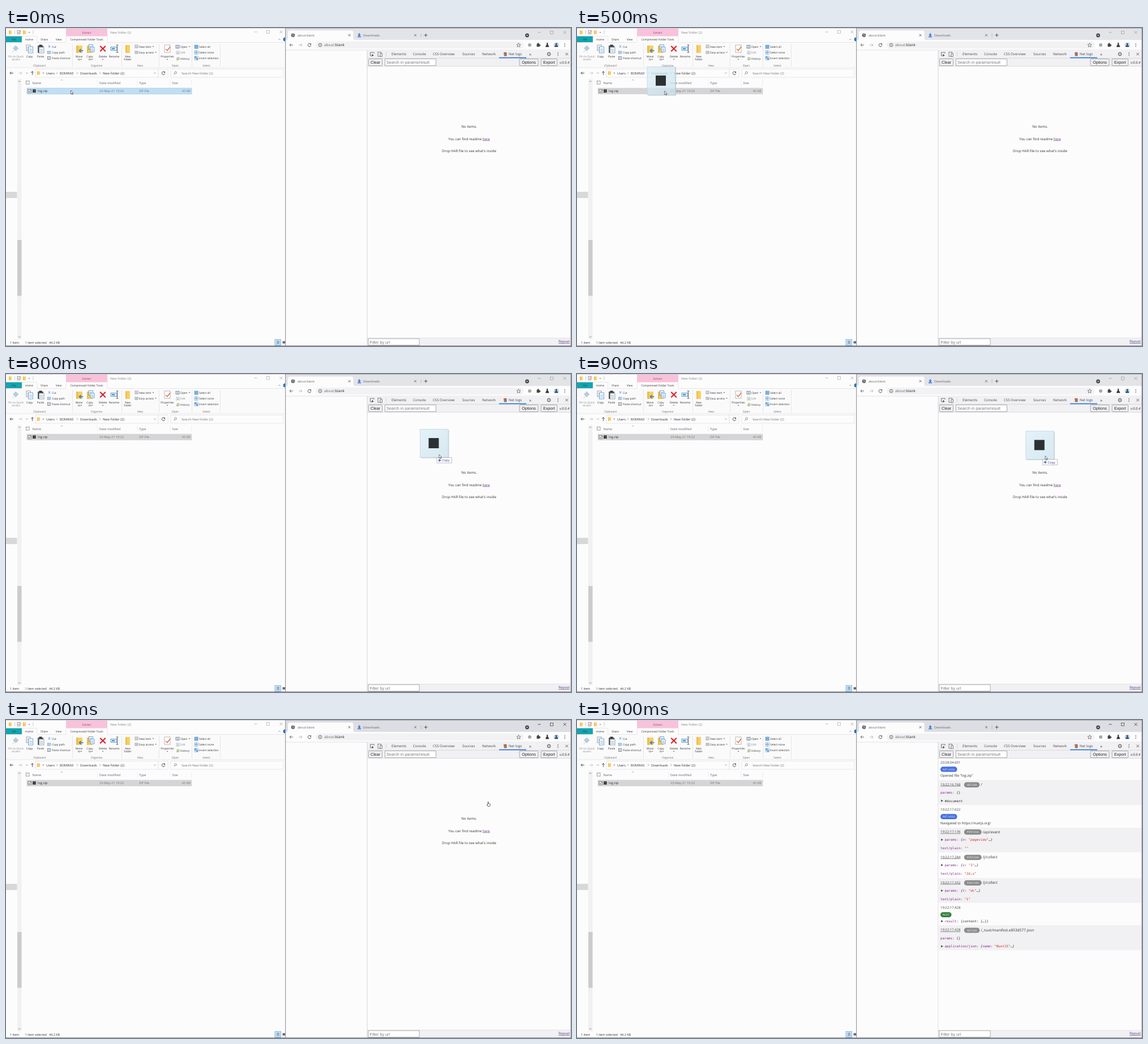
Animation of 998 by 561 pixels, one loop 2000 ms. Source, as an HTML page:

```html
<!DOCTYPE html>
<html lang="en">
<head>
<meta charset="utf-8">
<title>Drop a log file</title>
<style>
html, body { margin: 0; width: 100%; height: 100%; overflow: hidden; background: #fdfcfd; }
svg { display: block; width: 100vw; height: 100vh; font-family: "Open Sans", "Noto Sans", sans-serif; text-rendering: geometricPrecision; }
text { white-space: pre; }
.arial { font-family: "Liberation Sans", Arial, sans-serif; }
.mono { font-family: "DejaVu Sans Mono", "Liberation Mono", monospace; }
.key { fill: #8b2a96; }
.str { fill: #c4302b; }
</style>
</head>
<body>
<svg id="stage" viewBox="0 0 998 561" xmlns="http://www.w3.org/2000/svg"></svg>
<script>
const INK = '#333', GREY = '#777', BLUE = '#2f7fc4', GOLD = '#f8cf62';

// All text is placed by the vertical middle of its line.
const text = (x, y, s, size = 5.7, fill = INK, attrs = '') =>
  `<text x="${x}" y="${y + size * .36}" font-size="${size}" fill="${fill}" ${attrs}>${s}</text>`;
const mid = (x, y, s, size, fill, attrs = '') => text(x, y, s, size, fill, 'text-anchor="middle" ' + attrs);
const rect = (x, y, w, h, fill, stroke = 'none', attrs = '') =>
  `<rect x="${x}" y="${y}" width="${w}" height="${h}" fill="${fill}" stroke="${stroke}" stroke-width=".7" ${attrs}/>`;
const path = (d, stroke = INK, width = .8, fill = 'none') =>
  `<path d="${d}" stroke="${stroke}" stroke-width="${width}" fill="${fill}"/>`;
const dot = (x, y, r, fill, stroke = 'none') =>
  `<circle cx="${x}" cy="${y}" r="${r}" fill="${fill}" stroke="${stroke}" stroke-width=".8"/>`;
const group = (id, body) => `<g id="${id}">${body}</g>`;

const cross = (x, y, r, c, w = .8) => path(`M${x - r} ${y - r}l${2 * r} ${2 * r}m0 ${-2 * r}l${-2 * r} ${2 * r}`, c, w);
const arrow = (x, y, dir, c = INK) => path(`M${x - 3 * dir} ${y}h${6 * dir}m${-2.6 * dir} -2.6l${2.6 * dir} 2.6l${-2.6 * dir} 2.6`, c);
const chevron = (x, y, dx, dy, c = GREY) => path(dx
  ? `M${x - dx} ${y - 1.8}l${2 * dx} 1.8l${-2 * dx} 1.8`
  : `M${x - 1.8} ${y - dy}l1.8 ${2 * dy}l1.8 ${-2 * dy}`, c, .7);
const caret = (x, y, c = '#444') => path(`M${x - 1.3} ${y - .7}h2.6l-1.3 1.5z`, 'none', 0, c);
const folder = (x, y, w, h) => rect(x, y, w, h, GOLD) + rect(x, y, w * .3, h, '#efbb49');
const sheet = (x, y, w, h, c = GREY) => rect(x, y, w, h, '#fff', c) +
  path(`M${x + 1.5} ${y + h * .4}h${w - 3}m0 ${h * .3}h${3 - w}`, BLUE, .7);
const reload = (x, y) => path(`M${x + 2.4} ${y - 1.4}a2.8 2.8 0 1 0 .4 2`, '#444', .9) + path(`M${x + 3} ${y - 3.2}v2.6h-2.6z`, 'none', 0, '#444');
const menuDots = (x, y) => [-2.5, 0, 2.5].map(d => dot(x, y + d, .7, '#444')).join('');
const winButtons = (x, y, c) => path(`M${x - 2.5} ${y}h5`, c) + rect(x + 19.5, y - 2.5, 5, 5, 'none', c) + cross(x + 45, y, 2.5, c);

function ribbon() {
  const label = (x, y, s, c) => text(x, y, s, 4.85, c);
  const below = (x, s, c) => s.split('|').map((line, i) => mid(x, 50 + i * 5.5, line, 4.85, c)).join('');
  return rect(0, 25.5, 494, 44.5, '#fbfafb') + path('M0 25.5H28M55 25.5H106M179 25.5H494M0 70H494', '#dedde0', .7) +
    [117.5, 204.5, 270.5, 328.5, 378.5].map(x => path(`M${x} 28V68`, '#dcdcdf', .7)).join('') +
    // clipboard
    path('M17 31l5 5l-2 1l-2.5 3.5l-5 -5l3.5 -2.5zM15 38.5l-3.5 4', '#9db6c8', .7, '#b8cedd') +
    sheet(36, 30, 7, 10) + sheet(39.5, 33, 8, 11, BLUE) +
    rect(56, 31, 10, 13, '#57606a') + rect(58.5, 29.5, 5, 3, '#333') + sheet(58.5, 34, 8.5, 10) +
    path('M75 30.5l3 4M78 30.5l-3 4', BLUE) + sheet(73.5, 41, 5, 4, BLUE) + sheet(73.5, 50.5, 5, 5, '#555') +
    below(17.5, 'Pin to Quick|access', '#888') + below(41.5, 'Copy') + below(61, 'Paste') +
    label(81, 33, 'Cut') + label(81, 43, 'Copy path') + label(81, 53, 'Paste shortcut') +
    // organize
    folder(124, 31, 11, 13) + path('M136.5 40h-7m3 -3l-3 3l3 3', BLUE, 1.7) +
    folder(143, 31, 10, 13) + sheet(146.5, 29.5, 7, 8, BLUE) + sheet(149, 34, 7, 8, BLUE) +
    cross(171, 36.5, 4.8, '#d9262e', 2.2) +
    rect(185, 33.5, 11, 6, '#dcecf8', BLUE) + path('M187 36.5h5', BLUE, 2) + path('M194.5 30h4m-2 0v13m-2 0h4', '#444', .8) +
    below(129, 'Move|to') + below(148, 'Copy|to') + below(171, 'Delete') + below(191, 'Rename') +
    [133, 152, 171].map(x => caret(x, 55.5)).join('') +
    // new
    folder(211, 30, 8, 14) + sheet(228, 30, 5, 5) + sheet(228, 41, 5, 4) + below(215, 'New|folder') +
    label(235, 33, 'New item') + label(235, 43, 'Easy access') + caret(260, 33) + caret(264.5, 43) +
    // open
    rect(280, 30, 10, 13, '#fff', '#999') + path('M282 37l3 3l5 -7', '#e06a35', 1.4) + below(285, 'Properties') + caret(285, 55.5) +
    sheet(300, 30.5, 6, 5, '#4b5560') + sheet(301, 41, 5, 5, '#aaa') + dot(304, 54, 2.2, '#d5e5c9', '#7c9d70') + path('M301 56h3', '#e0a02e', 1.2) +
    label(308, 33, 'Open') + label(308, 43.5, 'Edit', '#888') + label(308, 54, 'History') + caret(324, 33) +
    // select
    [33, 43, 53].map((y, i) => [0, 3.5].map(dx => [0, 3.5].map(dy =>
      rect(333 + dx, y - 3 + dy, 2.7, 2.7, i === 0 || (i === 2 && dx === dy) ? '#6caee0' : '#fff', '#74a5ce')).join('')).join('') +
      label(341, y, ['Select all', 'Select none', 'Invert selection'][i])).join('') +
    [[59, 'Clipboard'], [160, 'Organize'], [237, 'New'], [299, 'Open'], [354, 'Select']]
      .map(([x, s]) => mid(x, 66, s, 4.85, '#666')).join('');
}

function explorer() {
  return rect(0, 0, 494, 561, '#fdfcfd') + path('M0 .4H494', '#bdbcc0', .8) +
    folder(5, 4.5, 5, 6.5) + rect(20, 4.5, 5, 6, '#fff', GREY) + path('M21 7l1.5 2l3 -4', '#d9483a') +
    folder(30, 4.5, 5, 6.5) + caret(41, 8) + path('M15.5 4v7M48 4v7', '#aaa', .6) +
    rect(106, 1, 73, 13.5, '#f8c2db') + mid(142.5, 8.5, 'Extract', 4.9, '#8c3c66') +
    text(184, 7.5, 'New folder (2)', 5.7, '#888') + winButtons(441, 7, '#aaa') +
    rect(0, 14.5, 28, 11, '#12a4af') + mid(14, 20, 'File', 4.9, '#174b52') +
    path('M28.3 25.5V14.5H54.7V25.5', '#dedde0', .7) + mid(41, 20, 'Home', 4.9) + mid(67.5, 20, 'Share', 4.9) + mid(93, 20, 'View', 4.9) +
    path('M106 25.5V14.5M179 14.5V25.5', '#ecd3df', .7) + mid(142.5, 20, 'Compressed Folder Tools', 4.95) +
    chevron(483, 20, 0, -.9) + dot(493, 20, 3.5, '#1979ca') + ribbon() +
    arrow(10, 79.5, -1) + arrow(25, 79.5, 1, '#bbb') + chevron(37, 79.5, 0, .9) + path('M46.5 83v-6.5m-2.4 2.4l2.4 -2.4l2.4 2.4') +
    rect(52, 72.5, 217, 14.5, '#fdfcfd', '#dddce0') + rect(269, 72.5, 17, 14.5, '#fdfcfd', '#dddce0') +
    rect(291, 72.5, 199, 14.5, '#fdfcfd', '#dddce0') + folder(55, 76.5, 5, 6) +
    text(64.5, 79, '«', 5.5) + text(71, 79.5, 'Users') + text(95, 79.5, 'BOMRAD') + text(131, 79.5, 'Downloads') + text(171, 79.5, 'New folder (2)', 5.8) +
    [90, 126, 166].map(x => chevron(x, 79.5, .8, 0)).join('') + chevron(263, 79.5, 0, .9) + reload(278, 79.5) +
    dot(299.5, 78.8, 1.9, 'none', GREY) + path('M298 80.3l-2 2', GREY) + text(310, 79.5, 'Search New folder (2)', 5.6, '#777') +
    // navigation pane
    rect(0, 289, 19.5, 11, '#d8d7d9') + rect(20, 90, 7.5, 459, '#f1f0f2') + rect(20, 374, 7.5, 98.5, '#cccbcd') +
    chevron(23.7, 94, 0, -.9, '#555') + chevron(23.7, 545, 0, .9, '#555') +
    // columns
    rect(35.5, 93.5, 5.5, 5.5, '#fff', GREY) + chevron(98.5, 91.8, 0, -.6, '#888') +
    [[46.5, 'Name'], [165, 'Date modified'], [235, 'Type'], [293.5, 'Size']].map(([x, s]) => text(x, 96.7, s, 5.6, '#5b6470')).join('') +
    [162, 232, 290, 328].map(x => path(`M${x} 91V102`, '#e5e4e8', .7)).join('') +
    rect(37, 106, 291, 10.5, '#c1def3', '#9cc9ea', 'id="row"') +
    rect(39, 108.5, 5.5, 5.5, '#fff', '#555') + path('M40 111l1.4 1.6l2.5 -3.2', '#333') + rect(47, 108.2, 5.8, 5.8, '#444') +
    text(56, 111.3, 'log.zip', 5.8) + text(165, 111.3, '23-May-21 19:22', 5.6, GREY) + text(235, 111.3, 'ZIP File', 5.5, GREY) +
    text(325.5, 111.3, '45 KB', 5.5, GREY, 'text-anchor="end"') +
    // status bar
    text(7, 555, '1 item', 5.5) + text(33.5, 555, '1 item selected', 5.45) + text(76, 555, '44.2 KB', 5.45) +
    rect(475, 549.5, 10.5, 10, '#cbe4f6', '#5aa2d8') + path('M478 552.5h5m-5 2h5m-5 2h5', '#456', .7) +
    rect(488.5, 552.5, 5, 4, '#667');
}

function browser() {
  const tabs = [[681, 'Elements'], [719, 'Console'], [754, 'CSS Overview'], [806, 'Sources'], [841, 'Network'], [888, 'Net logs']];
  const button = (x, w, s) => rect(x, 54.5, w, 12, '#efeef0', '#8b8b8f', 'rx="1"') + mid(x + w / 2, 60.4, s, 7.1, '#222', 'class="arial"');
  const input = (x, y, s) => rect(x, y, 90, 11.5, '#fff', '#8b8b8f') + text(x + 2.5, y + 6, s, 7.2, '#777', 'class="arial"');
  return rect(494, 0, 504, 561, '#fdfcfd') + rect(494, 1, 504, 20, '#e3e4e8', 'none', 'id="strip"') +
    path('M494 .5H998', '#a9a9ad', 1) +
    path('M495 21q3 0 3 -3V8q0 -3.5 3.5 -3.5H610q3.5 0 3.5 3.5V18q0 3 3 3z', 'none', 0, '#fdfcfd') +
    dot(507, 12.7, 3.3, '#555b62') + path('M505 11.5l2 .5l1 -2M506 15l1.5 -2l2 .5', '#dfe2e5', .8) +
    text(515, 12.7, 'about:blank', 5.4, '#666') + cross(606.5, 12.7, 1.9, '#444') +
    path('M624 9v4m-2 -1.5l2 2.2l2 -2.2M621 15.5h6', '#286bd8', 1.3) + text(631, 12.7, 'Downloads', 5.6, '#666') + cross(723, 12.7, 1.9, '#555') +
    path('M733 9v7', '#aaa', .7) + path('M738.5 12.7h6m-3 -3v6', '#444', .9) +
    dot(920.5, 13, 3.4, '#44484d') + path('M919 12.3h3l-1.5 2z', 'none', 0, '#fff') +
    group('controls', winButtons(942, 7.7, 'currentColor')) +
    // toolbar
    arrow(504, 30, -1, '#444') + arrow(520, 30, 1, '#aaa') + reload(536, 30) +
    rect(547, 23.7, 367, 12.6, '#f2f2f4', 'none', 'rx="6.3"') + dot(555, 30, 2.9, 'none', '#555') + path('M555 29.5v2.2m0 -3.7v.8', '#555') +
    text(562, 30, 'about:<tspan fill="#222">blank</tspan>', 6.45, '#666') +
    path('M905.5 26.5l1 2.4l2.6 .2l-2 1.7l.6 2.6l-2.2 -1.4l-2.2 1.4l.6 -2.6l-2 -1.7l2.6 -.2z', '#555', .7) +
    dot(925, 30, 3, '#a3aaa7') + rect(937.5, 28, 5, 5, '#444') + dot(940, 27.5, 1.3, '#444') + dot(943, 30.5, 1.2, '#444') +
    path('M954.8 26.5h2.6m-1.9 0v2.2l-2.3 4.4h5.8l-2.3 -4.4v-2.2', '#333', .8, '#333') +
    dot(972, 30, 4.8, '#bfdcf0') + dot(972, 28.3, 1.5, '#263746') + path('M969 33a3 2.7 0 0 1 6 0z', 'none', 0, '#263746') +
    menuDots(987, 30) + path('M494 39H998', '#d6d5da', .7) +
    // inspector
    rect(638, 39, 360, 28.5, '#f1f0f3') + path('M638 53.3H998M638 67.5H998', '#d0cfd4', .7) +
    path('M648 49H643.5V43H650V45', '#555', .8) + path('M646.5 45.5v4.8l1.3 -1.2h2z', 'none', 0, '#444') +
    rect(657, 42.5, 5.5, 7.5, 'none', '#555') + rect(661, 45, 3.5, 5.2, '#f1f0f3', '#555') + path('M671.5 42v8', '#ccc', .7) +
    tabs.map(([x, s]) => text(x, 46.3, s, 6.1, '#444')).join('') +
    path('M879.5 43.3h4.5v5.8h-3.3q-1.2 0 -.6 -1.5z', '#7d4428', .7, '#c98a63') + path('M881 45h2.3m-2.3 2h2.3', '#6b3418', .6) +
    rect(871, 51.7, 48, 1.5, '#1a6fdc') + mid(926, 45.8, '»', 8, '#444') +
    dot(959, 46, 2.2, 'none', '#444') + [0, 45, 90, 135].map(a => `<path d="M959 42.5v1.3M959 48.2v1.3" stroke="#444" stroke-width="1.2" transform="rotate(${a} 959 46)"/>`).join('') +
    menuDots(975, 46) + cross(990.5, 46, 2.3, '#444') +
    button(640.5, 24, 'Clear') + input(669.5, 54.7, 'Search in params/result') + button(907, 33, 'Options') + button(945, 28.5, 'Export') +
    text(978, 60.4, 'v.0.0.4', 6, INK, 'font-style="italic"') +
    rect(638, 547, 360, 13, '#f1f0f3') + path('M638 547H998', '#d8d7db', .7) + input(640, 548, 'Filter by url') +
    text(976, 553, 'Repvat', 6.2, '#5b3a86', 'text-decoration="underline"') +
    path('M638 39V560', '#c9c8cd', .8);
}

function emptyPage() {
  return mid(818, 174, 'No items.', 6.2) +
    mid(818, 195.3, 'You can find readme <tspan fill="#6a3a80" text-decoration="underline">here</tspan>', 6.15) +
    mid(818, 216.7, "Drop HAR file to see what's inside", 6.15);
}

function logPage() {
  const key = s => `<tspan class="key">${s}</tspan>`;
  const str = s => `<tspan class="str">"${s}"</tspan>`;
  const tip = s => `<tspan font-style="italic">${s}</tspan>`;
  const pair = (k, v) => tip('{' + key(k) + ': ' + str(v) + '…}');
  const mono = (y, s, opens) => (opens ? path(`M643 ${y - 2}l4 2l-4 2z`, 'none', 0, '#555') : '') +
    text(opens ? 649.5 : 642, y, s, 5.85, INK, 'class="mono"');
  const pill = (x, y, w, s, c) => rect(x, y - 4.6, w, 9.2, c, 'none', 'rx="4.6"') + mid(x + w / 2, y, s, 4.6, '#fff');
  const stamp = (y, s, attrs) => text(642, y, s, 5.95, '#444', attrs);
  const band = (y, h) => rect(638.5, y, 359, h, '#f1f0f2');
  const request = (y, time, verb, url) => {
    const w = verb.startsWith('POST') ? 31 : 27.5;
    return stamp(y - .6, time, 'text-decoration="underline"') + pill(683.7, y + .3, w, verb, '#8b8b8b') + text(685.7 + w, y, url, 6.5);
  };
  const note = (y, time, tag, w, c) => stamp(y, time) + pill(642, y + 12.2, w, tag, c);
  return rect(638.5, 68, 359, 479, '#fdfcfd') + band(106, 44) + band(190, 43.5) + band(279, 43.5) + band(362, 44) +
    note(74.7, '20:28:04.601', 'NET LOGS', 29.5, '#4571de') + text(642, 98.2, 'Opened file "log.zip"', 6.1) +
    request(114, '19:22:16.768', 'GET/200', '/') + mono(128, key('params:') + ' {}') + mono(142.5, '#document', true) +
    note(158.2, '19:22:17.022', 'NET LOGS', 29.5, '#4571de') + text(642, 181.7, 'Navigated to https://nuxtjs.org/', 6.1) +
    request(197.4, '19:22:17.136', 'POST/202', '/api/event') + mono(211.3, key('params: ') + pair('n', 'pageview'), true) + mono(226, key('text/plain: ') + str('')) +
    request(242, '19:22:17.284', 'POST/200', '/j/collect') + mono(256, key('params: ') + pair('v', '1'), true) + mono(271, key('text/plain: ') + str('2d,x')) +
    request(287, '19:22:17.352', 'POST/200', '/j/collect') + mono(301, key('params: ') + pair('t', 'dc'), true) + mono(315.7, key('text/plain: ') + str('1')) +
    note(331.3, '19:22:17.428', 'NUXT', 19.5, '#37813f') + mono(355, key('result: ') + tip('{content: {…}}'), true) +
    request(370.7, '19:22:17.428', 'GET/200', '/_nuxt/manifest.e853d577.json') + mono(384.5, key('params:') + ' {}') +
    mono(399.3, key('application/json: ') + pair('name', 'NuxtJS'), true);
}

const stage = document.getElementById('stage');
stage.innerHTML = `<defs><linearGradient id="glass" x2="1" y2="1">
    <stop stop-color="#dceff8" stop-opacity=".75"/><stop offset="1" stop-color="#cbe2ec" stop-opacity=".75"/>
  </linearGradient></defs>` +
  explorer() + browser() + group('empty', emptyPage()) + group('log', logPage()) +
  path('M493.6 0V561', '#9b9a9f', 1.2) + path('M997.6 0V561', '#9b9a9f', .9) + path('M0 560.5H998', '#8e8d92', 1) +
  group('tile', path('M1.5 50.4H50.4V1.5', '#b4c3cb', 1) + rect(0, 0, 49.5, 49.5, 'url(#glass)', '#b9d2de') + rect(15, 15.5, 18, 18, '#2d3033')) +
  group('copy', rect(29.5, 50, 26.5, 9.5, '#fdfcfd', '#a9a9ae') + path('M31.8 54.8h5m-2.5 -2.5v5', '#2855b0', 1.2) + text(38.7, 54.8, 'Copy', 5.6, '#3448a0')) +
  group('pointer', path('M0 0V6.6L1.5 5.2L2.6 7.6L3.6 7.1L2.5 4.8H4.5Z', '#222', .6, '#fff')) +
  group('hand', path('M-1 1.5V-3.3q.7 -1 1.4 0V-.6l2.8 .8v2.6l-.8 1.6h-3l-2 -2.8q.4 -.8 1.6 .4z', '#222', .7, '#fff'));

const part = Object.fromEntries([...stage.querySelectorAll('[id]')].map(el => [el.id, el]));
const show = (el, on) => el.setAttribute('display', on ? 'inline' : 'none');
const move = (el, x, y) => el.setAttribute('transform', `translate(${x} ${y})`);

// start time, pointer x, y, tile x, y
const steps = [
  [0, 114.5, 110],
  [300, 118, 110],
  [400, 130, 110.5, 99, 67.5],
  [500, 154.8, 111, 124, 68.3],
  [600, 330, 118, 299, 75],
  [700, 588, 133, 556, 88.8],
  [800, 765, 142, 731.5, 97.5],
  [900, 827, 144.5, 792.8, 100.8],
  [1000, 849, 145, 815, 101],
  [1100, 852, 148],
  [1300]
];

function draw() {
  const time = performance.now() % 2000;
  const [start, x, y, tileX, tileY] = steps.findLast(step => step[0] <= time);
  const dragging = tileX !== undefined;
  const focused = start >= 1100, loaded = start >= 1300;
  show(part.tile, dragging);
  show(part.copy, dragging && x > 494);
  show(part.pointer, !focused);
  show(part.hand, focused && !loaded);
  show(part.empty, !loaded);
  show(part.log, loaded);
  if (dragging) [part.tile, part.copy].forEach(el => move(el, tileX, tileY));
  if (!loaded) move(focused ? part.hand : part.pointer, x, y);
  part.row.setAttribute('fill', start < 400 ? '#c1def3' : '#d5d4d6');
  part.row.setAttribute('stroke', start < 400 ? '#9cc9ea' : '#d5d4d6');
  part.strip.setAttribute('fill', focused ? '#dddee3' : '#e3e4e8');
  part.controls.setAttribute('color', focused ? '#333' : '#999');
  requestAnimationFrame(draw);
}
draw();
</script>
</body>
</html>
```
